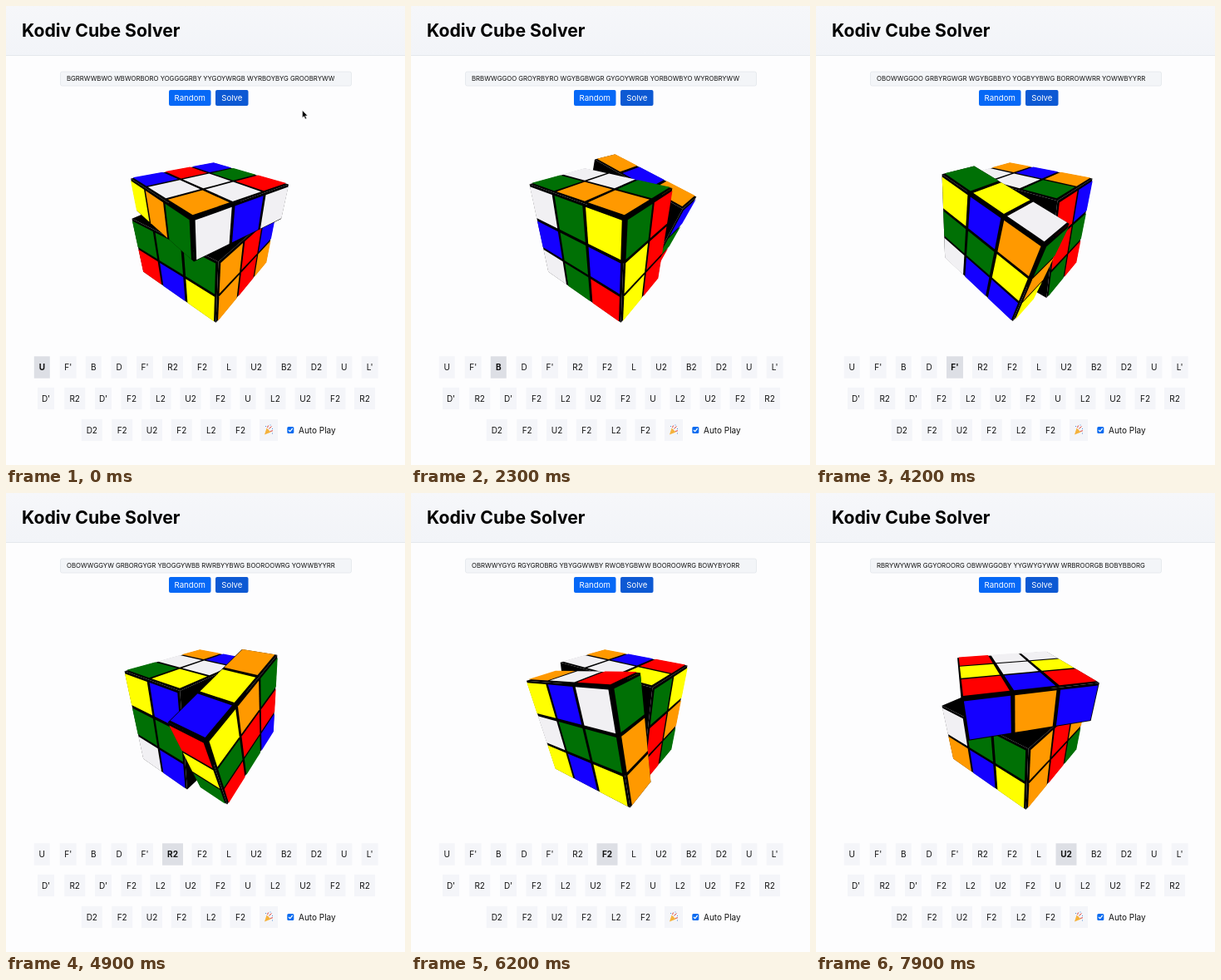
Animation of 480 by 552 pixels, one loop 8000 ms. Source, as an HTML page:

```html
<!DOCTYPE html>
<html lang="en">
<head>
<meta charset="utf-8">
<title>Kodiv Cube Solver</title>
<style>
  html, body { margin: 0; height: 100%; overflow: hidden; background: #fdfdfe; }
  svg { display: block; width: 480px; height: 552px; font: 10px Inter, sans-serif; fill: #111; }
  .mid { text-anchor: middle; }
  .move rect { fill: #f4f5f9; }
  .move.on rect { fill: #dddfe5; }
  .move.on text { font-weight: 700; }
</style>
</head>
<body>
<svg viewBox="0 0 480 552">
  <defs>
    <linearGradient id="bar" x2="0" y2="1">
      <stop stop-color="#f6f7fa"/><stop offset="1" stop-color="#f2f4f8"/>
    </linearGradient>
  </defs>
  <rect width="480" height="59" fill="url(#bar)"/>
  <rect y="59" width="480" height="1" fill="#e5e8ed"/>
  <text x="19" y="37" font-size="21.2" font-weight="700" fill="#000">Kodiv Cube Solver</text>

  <rect x="65.5" y="79" width="350" height="17" rx="2" fill="#f3f5f8" stroke="#e3e6eb" stroke-width=".8"/>
  <text id="state" x="73" y="90.3" font-size="7.77"></text>
  <g class="mid" font-size="9.6">
    <rect x="196" y="101" width="50.5" height="19" rx="2" fill="#0668f6"/>
    <rect x="252" y="101" width="39.5" height="19" rx="2" fill="#0d59d3"/>
    <text x="221.2" y="114" fill="#fff">Random</text>
    <text x="271.8" y="114" fill="#fff">Solve</text>
  </g>

  <g id="cube"></g>
  <g id="moves" class="mid"></g>

  <rect x="305" y="497" width="22" height="26" fill="#f4f5f9"/>
  <path d="M311 515.5l2.6-8 5 5z" fill="#f5b23c"/>
  <path d="M314.5 507l1-2.5M318 511.5l3-.8M316.5 508.5l3-3" stroke="#d8473f" fill="none"/>
  <path d="M312 505.5h1M320 508.5h1M317.5 504h1M320 514h1" stroke="#4a8fd8" fill="none"/>
  <rect x="338.3" y="506" width="8" height="8" rx="1.5" fill="#0b6cf0"/>
  <path d="M340 510l1.7 1.7 3-3.7" fill="none" stroke="#fff" stroke-width="1.2"/>
  <text x="352" y="513.6">Auto Play</text>

  <path id="cursor" d="M356.5 125.5v9l2-1.9 1.5 3.4 1.6-.7-1.5-3.3h2.7z" fill="#000" stroke="#fff" stroke-width=".5"/>
</svg>
<script>
const $ = id => document.getElementById(id);

// Move list: label and centre of each button, by row
const rows = [
  [434.5, "U F' B D F' R2 F2 L U2 B2 D2 U L'", [43.3, 74.7, 105.3, 136, 167, 200.5, 236, 268, 301, 337.3, 373.5, 406.8, 437.7]],
  [472, "D' R2 D' F2 L2 U2 F2 U L2 U2 F2 R2", [48, 82.7, 117, 151, 186, 222, 258, 291, 324, 360, 396, 431.5]],
  [510, "D2 F2 U2 F2 L2 F2", [103.3, 139.7, 175.5, 211.3, 246.8, 282]]
];
$('moves').innerHTML = rows.map(([y, labels, xs]) => labels.split(' ').map((label, i) => {
  const w = label[1] === '2' ? 25 : label[1] ? 20 : 19;
  return `<g class="move"><rect x="${xs[i] - w / 2}" y="${y - 13.2}" width="${w}" height="26.4"/>` +
    `<text x="${xs[i]}" y="${y + 3.6}">${label}</text></g>`;
}).join('')).join('');
const buttons = [...document.querySelectorAll('.move')];

// Faces in URFDLB order: normal, direction of columns, direction of rows
const faces = {
  U: [[0, 1, 0], [1, 0, 0], [0, 0, 1]],
  R: [[1, 0, 0], [0, 0, -1], [0, -1, 0]],
  F: [[0, 0, 1], [1, 0, 0], [0, -1, 0]],
  D: [[0, -1, 0], [1, 0, 0], [0, 0, -1]],
  L: [[-1, 0, 0], [0, 0, 1], [0, -1, 0]],
  B: [[0, 0, -1], [-1, 0, 0], [0, -1, 0]]
};
const faceList = Object.values(faces);
const colors = { W: '#f1f0f3', R: '#ff0000', G: '#007005', Y: '#ffff00', O: '#ff9900', B: '#1400ff' };
const corners = [[-1, -1], [1, -1], [1, 1], [-1, 1]];

const at = ([n, u, v], h, a, b) => n.map((c, i) => c * h + u[i] * a + v[i] * b);
const stickers = faceList.flatMap(face => [...Array(9).keys()].map(i => {
  const a = i % 3 - 1, b = Math.floor(i / 3) - 1;
  return { face, a, b, pos: at(face, 1.5, a, b) };
}));

function parseMove(label) {
  const normal = faces[label[0]][0], axis = normal.findIndex(c => c);
  const sign = normal[axis];
  const turn = label[1] === '2' ? 180 : label[1] ? -90 : 90;
  return { axis, sign, angle: -sign * turn * Math.PI / 180, has: p => p[axis] * sign > .6 };
}

function rotate(p, axis, angle) {
  const i = (axis + 1) % 3, j = (axis + 2) % 3, q = [...p];
  const c = Math.cos(angle), s = Math.sin(angle);
  q[i] = p[i] * c - p[j] * s;
  q[j] = p[i] * s + p[j] * c;
  return q;
}

function applyMove(state, m) {
  const next = [...state];
  stickers.forEach(({ pos }, i) => {
    if (!m.has(pos)) return;
    const to = rotate(pos, m.axis, m.angle);
    next[stickers.findIndex(s => s.pos.every((c, k) => Math.abs(c - to[k]) < .1))] = state[i];
  });
  return next;
}

const moves = rows[0][1].split(' ').slice(0, 9).map(parseMove);
const states = [[...'BGRRWWBWOWBWORBOROYOGGGGRBYYYGOYWRGBWYRBOYBYGGROOBRYWW']];
moves.forEach((m, i) => states.push(applyMove(states[i], m)));

// Camera
const az = 38.5 * Math.PI / 180, el = 31 * Math.PI / 180, dist = 6.15, focal = 242;
function project([x, y, z]) {
  const r = x * Math.cos(az) - z * Math.sin(az);
  const h = x * Math.sin(az) + z * Math.cos(az);
  const k = focal / (dist - h * Math.cos(el) - y * Math.sin(el));
  return [241.2 + k * r, 268.7 - k * (y * Math.cos(el) - h * Math.sin(el))];
}

// Polygon markup, empty when the quad faces away
function quad(points, fill) {
  const p = points.map(project);
  const area = p.reduce((sum, [x, y], i) => {
    const [x2, y2] = p[(i + 1) % 4];
    return sum + x * y2 - x2 * y;
  }, 0);
  if (area <= 0) return '';
  return `<polygon points="${p.map(q => q.map(c => c.toFixed(2))).join(' ')}" fill="${fill}"/>`;
}

function drawPart(state, m, moving, angle) {
  const lo = [-1.5, -1.5, -1.5], hi = [1.5, 1.5, 1.5];
  if (moving === m.sign > 0) lo[m.axis] = moving ? .5 : -.5;
  else hi[m.axis] = moving ? -.5 : .5;
  const place = p => moving ? rotate(p, m.axis, angle) : p;
  const body = faceList.map(face => quad(corners.map(([a, b]) =>
    place(at(face, 1, a, b).map((c, i) => c > 0 ? hi[i] : lo[i]))), '#000'));
  const tiles = stickers.map(({ face, a, b, pos }, i) => m.has(pos) !== moving ? '' :
    quad(corners.map(([s, t]) => place(at(face, 1.53, a + s * .455, b + t * .455))), colors[state[i]]));
  return body.join('') + tiles.join('');
}

const LOOP = 8000, STEP = 100, FIRST = -254, PERIOD = 948, TURN = 930;
const ease = x => x < .5 ? 2 * x * x : 1 - 2 * (1 - x) ** 2;
let shown = -1;

function draw(t) {
  const k = Math.floor((t - FIRST) / PERIOD);
  const m = moves[k], state = states[k];
  const angle = m.angle * ease(Math.min(1, (t - FIRST - k * PERIOD) / TURN));
  // The camera sits on the positive side of every cut
  const order = m.sign > 0 ? [false, true] : [true, false];
  $('cube').innerHTML = order.map(moving => drawPart(state, m, moving, angle)).join('');
  $('state').textContent = state.join('').match(/.{9}/g).join(' ');
  buttons.forEach((b, i) => b.classList.toggle('on', i === k));
  $('cursor').style.display = t < STEP ? '' : 'none';
}

const begin = performance.now();
function tick() {
  const t = Math.floor((performance.now() - begin) % LOOP / STEP) * STEP;
  if (t !== shown) draw(shown = t);
  requestAnimationFrame(tick);
}
tick();
</script>
</body>
</html>
```
